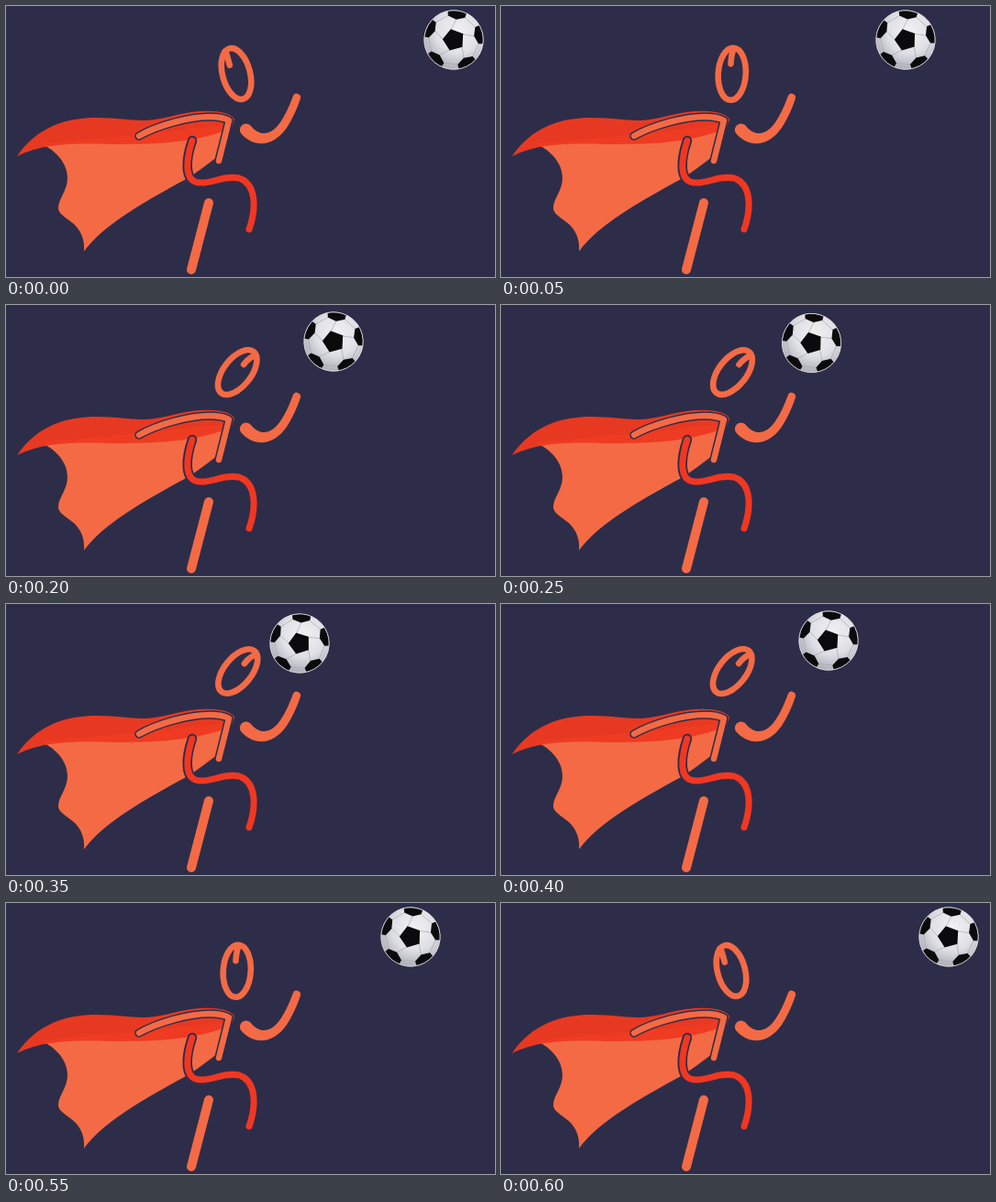
Recreate the animation shown at these times as an HTML page. Size 533 by 296 pixels, loop 650 ms.

```html
<!DOCTYPE html>
<html lang="en">
<head>
<meta charset="utf-8">
<title>Header</title>
<style>
  html, body { margin: 0; width: 100%; height: 100%; overflow: hidden; background: #2d2d49; }
  svg { display: block; width: 100%; height: 100%; }
  .line { fill: none; stroke-linecap: round; stroke-linejoin: round; }
  .orange { stroke: #f46a45; }
  .red { stroke: #f03722; }
  .gap { stroke: #2d2d49; }
</style>
</head>
<body>
<svg viewBox="0 0 533 296">
  <defs>
    <radialGradient id="shine" cx=".55" cy=".36" r=".66">
      <stop offset="0" stop-color="#f2f2f5"/>
      <stop offset=".55" stop-color="#dfdfe5"/>
      <stop offset="1" stop-color="#a9a9b4"/>
    </radialGradient>
    <clipPath id="round"><circle r="32"/></clipPath>
  </defs>

  <!-- cape -->
  <path fill="#f46a45" d="M37 150C52 156 67 170 67 188C67 202 57 210 57 221C58 234 87 234 85 268C108 236 162 208 200 187L214 177L234 162L240 130L150 140Z"/>
  <path fill="#ef3a21" fill-opacity=".96" d="M12 164C34 132 65 122 99 122C128 122 141 127 162 124C186 120 203 113 225 115Q245 116 249 124L246 132Q236 138 224 141C190 150 160 151 115 151C75 150 40 150 12 164Z"/>

  <!-- back arm and torso -->
  <g class="line">
    <path class="gap" stroke-width="9.5" d="M145 142C166 130 200 121 222 121Q236 121 243 125L232 169"/>
    <path class="orange" stroke-width="6.5" d="M145 142C166 130 200 121 222 121Q236 121 243 125L232 169"/>
  </g>

  <!-- legs -->
  <g class="line">
    <path class="gap" stroke-width="10.5" d="M203 147C195 170 196 188 206 192"/>
    <path class="red" stroke-width="7" d="M203 147C195 172 195 193 212 193C229 193 236 185 254 188C273 194 273 221 265 244"/>
    <path class="orange" stroke-width="10" d="M221 215L202 288"/>
  </g>

  <!-- front arm -->
  <path fill="#f46a45" d="M256 139C268 153 289 157 306 133Q315 119 321 101A4.3 4.3 0 0 0 313 98Q306 117 299 127C289 142 276 143 266 130A6.8 6.8 0 0 0 256 139Z"/>

  <g id="head" class="line orange" stroke-width="6.6">
    <ellipse rx="15" ry="28.6"/>
    <path id="curl"/>
  </g>

  <g id="ball">
    <circle r="32.4" fill="url(#shine)"/>
    <g clip-path="url(#round)">
      <path id="seams" fill="none" stroke="#aaaab4" stroke-width=".7"/>
      <path id="patches" fill="#0b0b0d"/>
    </g>
    <circle r="32.2" fill="none" stroke="#e9e9ee" stroke-width=".7"/>
  </g>
</svg>
<script>
const $ = id => document.getElementById(id);

// Each pose: ball x, y, spin; head x, y, tilt; curl start x, end x
const poses = [
  [488, 37, 7, 251, 74, -15, -5, -4.5],
  [394, 37, 4, 252.5, 74.5, 22, 5.5, .5],
  [357, 40, 7, 252.2, 73.5, 38, 4.5, .2],
  [320, 43, 4, 252.8, 73.5, 39, 4.5, .2]
];
// Position along the poses, one entry per 50 ms
const steps = [0, .5, 1, 1.5, 2, 2.5, 3, 3, 2, 1.5, 1, .5, 0];

const polar = (r, deg) => {
  const a = (deg - 90) * Math.PI / 180;
  return (r * Math.cos(a)).toFixed(2) + ' ' + (r * Math.sin(a)).toFixed(2);
};
const poly = points => 'M' + points.map(p => polar(...p)).join('L');

function buildBall() {
  const centre = [], twist = -22;
  let patches = '', seams = '';
  for (let a = 0; a < 360; a += 72) {
    centre.push([12.2, a + twist]);
    patches += poly([[22.5, a], [27.3, a + 20], [35, a + 18], [35, a - 18], [27.3, a - 20]]) + 'Z';
    seams += poly([[11.5, a + twist], [22.5, a]]) + poly([[27.3, a + 20], [27.3, a + 52]]);
  }
  $('patches').setAttribute('d', patches + poly(centre) + 'Z');
  $('seams').setAttribute('d', seams);
}

function place(id, x, y, angle) {
  $(id).setAttribute('transform', `translate(${x} ${y}) rotate(${angle})`);
}

function draw() {
  const s = steps[Math.floor(performance.now() % 650 / 50)];
  const i = Math.min(Math.floor(s), 2);
  const [bx, by, spin, hx, hy, tilt, from, to] =
    poses[i].map((v, k) => v + (poses[i + 1][k] - v) * (s - i));
  place('ball', bx, by, spin);
  place('head', hx, hy, tilt);
  $('curl').setAttribute('d', `M${from} -27Q${to} -22 ${to} -11`);
  requestAnimationFrame(draw);
}

buildBall();
draw();
</script>
</body>
</html>
```
